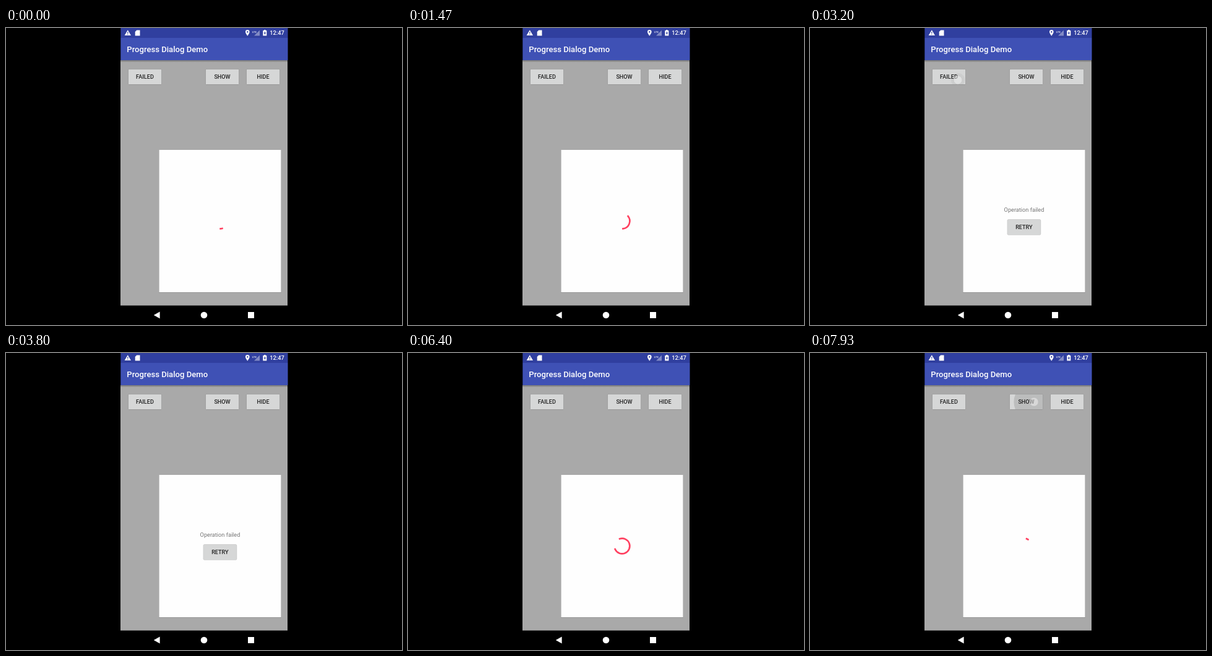
Write an HTML page that moves like this. It is 640 by 480 pixels and loops after 8000 ms.

```html
<!DOCTYPE html>
<html lang="en">
<head>
<meta charset="utf-8">
<title>Progress Dialog Demo</title>
<style>
  html, body { margin: 0; width: 100%; height: 100%; overflow: hidden; background: #000; }
  svg { display: block; width: 100vw; height: 100vh; }
  text { font-family: Roboto, sans-serif; font-weight: 500; }
  .label { font-size: 9.1px; text-anchor: middle; fill: #202020; }
</style>
</head>
<body>
<svg id="stage" viewBox="0 0 640 480">
  <defs>
    <linearGradient id="shade" x2="0" y2="1">
      <stop stop-color="#505050" stop-opacity=".6"/>
      <stop offset="1" stop-color="#505050" stop-opacity="0"/>
    </linearGradient>
  </defs>
  <rect width="640" height="480"/>
  <rect x="185" y="52" width="270" height="396.5" fill="#a9a9a9"/>
  <rect x="185" y="52" width="270" height="3.5" fill="url(#shade)"/>
  <rect x="185.3" width="270.2" height="16" fill="#303f9f"/>
  <rect x="185.3" y="16" width="270.2" height="36" fill="#3f51b5"/>
  <text x="195.3" y="39" font-size="13.1" fill="#fff">Progress Dialog Demo</text>

  <!-- status bar -->
  <g fill="#fff">
    <path fill-rule="evenodd" d="M196.8 3.2 202 12h-10.4zM196.2 6.3v2.8h1.2v-2.8zm0 3.6v1.2h1.2v-1.2z"/>
    <path d="M211.3 3.4h5.2v9.2h-7.8V6z"/>
    <path fill-rule="evenodd" d="M390.3 3a3.3 3.3 0 0 1 3.3 3.3c0 2.3-3.3 6.4-3.3 6.4s-3.3-4.1-3.3-6.4A3.3 3.3 0 0 1 390.3 3zm0 2.1a1.2 1.2 0 1 0 .01 0z"/>
    <path fill-rule="evenodd" d="M417 3h2.6v1h1.7v8.6h-6V4h1.7zm1.8 2.1-2 3.8h1.2v2.6l2-3.9h-1.2z"/>
    <path d="M410 3.5v9h-9z" opacity=".4"/>
    <text x="398" y="7.6" font-size="4.2">LTE</text>
    <text x="426.2" y="11.4" font-size="9.3">12:47</text>
  </g>

  <rect x="247" y="197" width="198" height="230.8" fill="#707070" opacity=".35"/>
  <rect x="247.5" y="197" width="197" height="230" fill="#fefefe"/>

  <g id="buttons"></g>
  <g id="failed">
    <text x="346" y="296.5" font-size="9.2" text-anchor="middle" fill="#757575" style="font-weight:400">Operation failed</text>
  </g>
  <path id="arc" fill="none" stroke="#ff4060" stroke-width="2.63" stroke-linecap="square"/>
  <circle id="touch" r="7" fill="#f4f4f4" fill-opacity=".5" stroke="#b8b8b8" stroke-opacity=".6" stroke-width=".8"/>

  <!-- navigation bar -->
  <g fill="#fff">
    <path d="M238.8 464 248.6 458.4V469.6z"/>
    <circle cx="320" cy="464" r="5.3"/>
    <rect x="391" y="459" width="10" height="10"/>
  </g>
</svg>
<script>
const $ = id => document.getElementById(id);
const LOOP = 8000, FPS = 15;
const CYCLE = 1333, SPIN = 720 / 4444;        // spinner: ms per trim cycle, degrees per ms
const CX = 346, CY = 312, R = 12.4;

const runs = [[-5420, 3180], [4520, 6760], [7850, LOOP]];
const taps = [
  { id: 'FAILED', x: 239, y: 84, at: 3130 },
  { id: 'RETRY', x: 350, y: 323, at: 4400 },
  { id: 'HIDE', x: 418, y: 80, at: 6630 },
  { id: 'SHOW', x: 362, y: 79, at: 7730 }
];

function button(parent, name, x, y) {
  const box = `x="${x}" y="${y}" width="53.5" height="24.3" rx="1.2"`;
  parent.insertAdjacentHTML('beforeend', `
    <clipPath id="clip${name}"><rect ${box}/></clipPath>
    <rect ${box} fill="#606060" opacity=".4" stroke="#606060" stroke-width="1"/>
    <rect ${box} fill="#d6d7d7"/>
    <circle id="${name}" clip-path="url(#clip${name})"/>
    <text class="label" x="${x + 26.7}" y="${y + 15.4}">${name}</text>`);
}
button($('buttons'), 'FAILED', 197.8, 66.8);
button($('buttons'), 'SHOW', 322.8, 66.8);
button($('buttons'), 'HIDE', 388.8, 66.8);
button($('failed'), 'RETRY', 319.2, 309.8);

// Bezier (0,0) (.2,0) (.1,1) (.5,1), held outside its range
function ease(x) {
  if (x <= 0) return 0;
  if (x >= .5) return 1;
  let lo = 0, hi = 1;
  for (let i = 0; i < 24; i++) {
    const u = (lo + hi) / 2, v = 1 - u;
    if (.6 * u * v * v + .3 * u * u * v + .5 * u ** 3 < x) lo = u; else hi = u;
  }
  return lo * lo * (3 - 2 * lo);
}

function point(deg) {
  const a = deg * Math.PI / 180;
  return `${CX + R * Math.sin(a)} ${CY - R * Math.cos(a)}`;
}

function arcPath(age) {
  const p = age % CYCLE / CYCLE;
  const turn = age * SPIN + 90 * p;
  const from = 270 * ease(p - .5);
  const to = Math.max(270 * ease(p), from + .5);
  return `M${point(turn + from)}A${R} ${R} 0 ${+(to - from > 180)} 1 ${point(turn + to)}`;
}

function draw(t) {
  const run = runs.find(([a, b]) => t >= a && t < b);
  $('arc').setAttribute('d', run ? arcPath(t - run[0]) : '');
  $('failed').style.display = t >= runs[0][1] && t < runs[1][0] ? '' : 'none';

  for (const tap of taps) {
    const age = t - tap.at, ripple = $(tap.id);
    const on = age >= 0 && age < 670;
    ripple.setAttribute('cx', tap.x);
    ripple.setAttribute('cy', tap.y);
    ripple.setAttribute('r', on ? Math.min(age * .16, 56) : 0);
    ripple.setAttribute('opacity', .12 * Math.max(0, Math.min(1, age / 200, (670 - age) / 350)));
  }
  const tap = taps.find(({ at }) => t >= at && t < at + 230);
  $('touch').style.display = tap ? '' : 'none';
  if (tap) $('touch').setAttribute('transform', `translate(${tap.x} ${tap.y})`);
}

const start = performance.now();
function tick() {
  const t = (performance.now() - start) % LOOP;
  draw(Math.floor((t + 5) * FPS / 1000) * 1000 / FPS % LOOP);
  requestAnimationFrame(tick);
}
tick();
</script>
</body>
</html>
```
